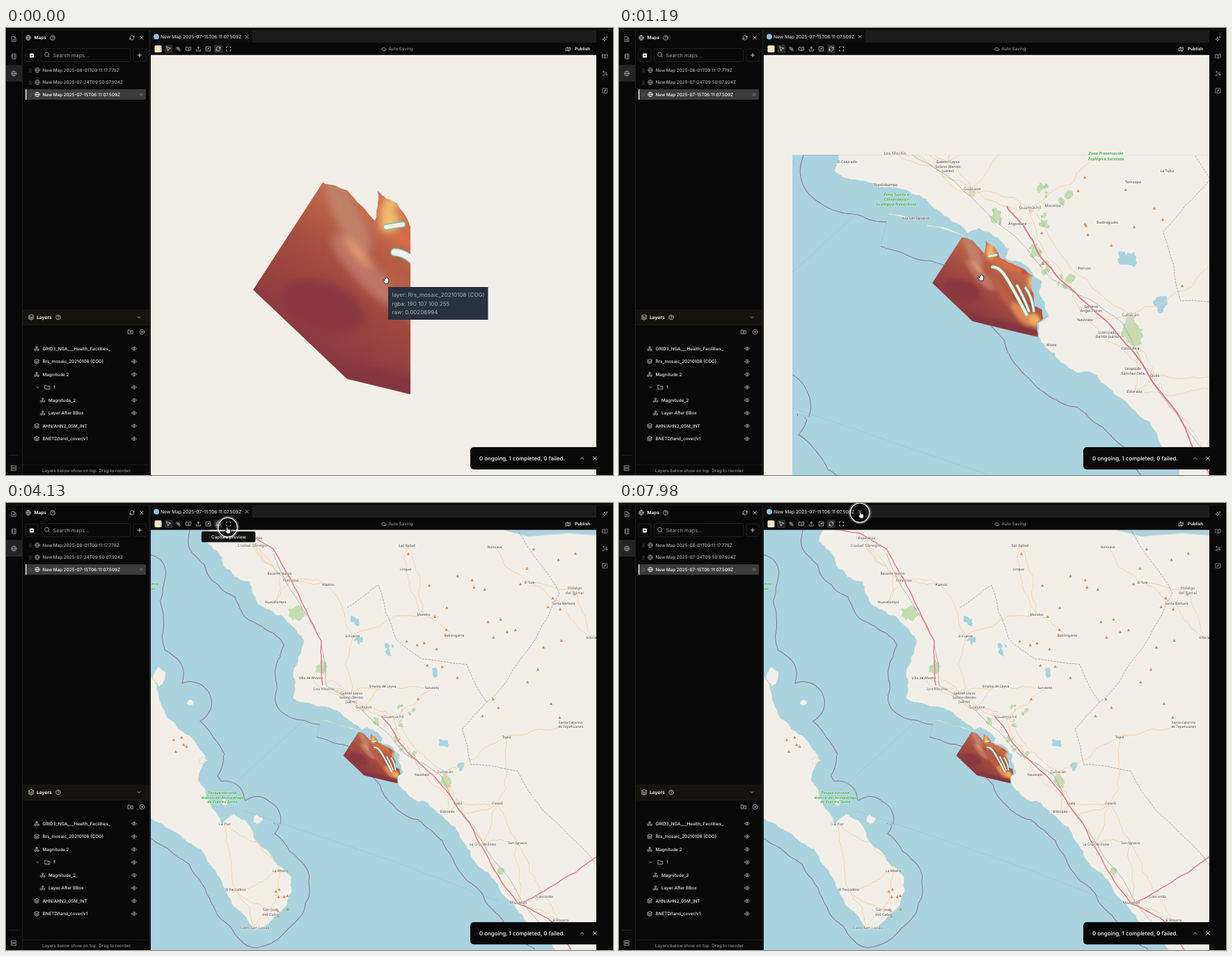
These frames come from a looping animation (872x642 px, 8 s). An HTML page:

```html
<!DOCTYPE html>
<html lang="en">
<head>
<meta charset="utf-8">
<title>Map workspace</title>
<style>
html, body { margin: 0; width: 100%; height: 100%; overflow: hidden; background: #080808; }
svg { display: block; width: 872px; height: 642px; font-family: Inter, "Liberation Sans", sans-serif; text-rendering: geometricPrecision; }
.map text { font-family: "Noto Sans", "DejaVu Sans", sans-serif; text-anchor: middle; fill: #383838;
  stroke: #fff; stroke-opacity: .75; stroke-width: .9px; paint-order: stroke; stroke-linejoin: round; }
.map text.city { fill: #5c5c5c; }
.map text.park { fill: #38a840; font-weight: 600; font-style: italic; }
.line { fill: none; vector-effect: non-scaling-stroke; stroke-linejoin: round; }
.icon { fill: none; stroke-width: 2; stroke-linecap: round; stroke-linejoin: round; }
</style>
</head>
<body>
<svg id="stage" viewBox="0 0 872 642" xmlns="http://www.w3.org/2000/svg"></svg>
<script>
// ---------- geometry helpers ----------
const PIVOT = [521, 359], FAR = 0.2202, MID = 0.431;
const SCALE = { far: 1, mid: MID / FAR, near: 1 / FAR };   // world units are far-view pixels
const SEA = "#aad3df", LAND = "#f2efe9";

let seed = 7;
const random = () => {
  seed = (seed + 0x6D2B79F5) | 0;
  let r = Math.imul(seed ^ (seed >>> 15), 1 | seed);
  r = (r + Math.imul(r ^ (r >>> 7), 61 | r)) ^ r;
  return ((r ^ (r >>> 14)) >>> 0) / 4294967296;
};
const jitter = size => (random() - 0.5) * 2 * size;
const points = str => str.split(" ").map(p => p.split(",").map(Number));
const rescale = (p, s) => p.map((v, i) => PIVOT[i] + (v - PIVOT[i]) * s);
const closeUp = str => points(str).map(p => rescale(p, FAR));
const pathOf = pts => "M" + pts.map(p => p.map(v => v.toFixed(2)).join(" ")).join("L");

// Midpoint displacement turns a few key points into a natural line
const rough = (pts, amount, depth = 4) => depth === 0 ? pts :
  rough(pts.flatMap((b, i) => {
    if (i === 0) return [b];
    const a = pts[i - 1], d = jitter(amount);
    return [[(a[0] + b[0]) / 2 - (b[1] - a[1]) * d, (a[1] + b[1]) / 2 + (b[0] - a[0]) * d], b];
  }), amount, depth - 1);
const patch = (x, y, r) => {
  const ring = Array.from({ length: 7 }, (_, i) => {
    const a = i / 7 * 2 * Math.PI, d = r * (0.5 + random() * 0.7);
    return [x + d * Math.cos(a) * 0.8, y + d * Math.sin(a)];
  });
  return pathOf(rough([...ring, ring[0]], 0.25, 3));
};
const patches = (centres, count, spread, r) => centres.map(([x, y]) =>
  Array.from({ length: count }, () => patch(x + jitter(spread), y + jitter(spread), r * (0.5 + random()))).join("")).join("");
const fill = (color, d, more = "") => `<path fill="${color}" d="${d}" ${more}/>`;
const line = (color, width, d, more = "") => `<path class="line" stroke="${color}" stroke-width="${width}" d="${d}" ${more}/>`;

// ---------- land and water ----------
const mainland = [
  ...points("300,-60 287,55 312,90 350,113 362,146 398,163 427,196 412,244 412,280 446,292"),
  ...closeUp("208,54 285,76 335,95 372,130 440,178 474,208 512,192 576,224 612,262 600,290 650,305 690,340 722,370 713,410 738,470 745,490 712,510 712,557 735,590 785,642"),
  ...points("606,431 645,465 693,531 728,572 774,617 830,690 1200,690 1200,-60 300,-60")];
const peninsula = points("140,90 204,100 204,240 222,286 248,325 287,366 276,398 310,462 327,446 343,455 379,503 410,538 404,577 358,613 333,584 307,538 280,497 226,462 140,410 140,90");
const sandbars = [closeUp("210,142 252,148 336,186 252,154 210,146"), closeUp("336,182 390,188 472,222 390,194 340,186"),
  closeUp("556,318 630,430 690,500")];
const islands = [[222, 250, 13], [362, 455, 8], [314, 430, 6], [283, 370, 9], [264, 286, 6]];
const land = pathOf(rough(mainland, 0.13)) + pathOf(rough(peninsula, 0.1)) +
  sandbars.map(s => pathOf(rough(s, 0.05, 2))).join("") + islands.map(i => patch(...i)).join("");

const woods = closeUp("568,150 725,70 800,90 735,165 705,270 735,325 800,370");
const parks = points("418,160 456,236 712,526 632,396");
const lakes = points("502,170 505,198 628,342 656,374 552,210 612,244");
const towns = points("514,296 557,309 631,388");

// ---------- places; marks: * city, + park, n/m/f view, e fades in, l fades out ----------
const parse = (list, s) => list.trim().split("\n").map(row => {
  const [, x, y, marks, name] = row.match(/^([\d.]+),([\d.]+) (\S+) (.*)$/);
  return { at: rescale([+x, +y], s), marks, name };
});
const region = parse(`
514,293 *nmf Guasave
556.7,307 *nmf Guamúchil
547.3,319 nml Angostura
573.6,305.5 nm Mocorito
472,315 nm Isla San Ignacio
572.5,408.6 nm Altata
631,386 *mf Culiacán
597.5,390 mf Navolato
602,380 ml General|Ángel Flores
597,352 ml Pericos
614,318 ml Badiraguato
614,399 ml Licenciado|Benito Juárez
631,411 ml Costa Rica
633,426 m Leopoldo|Sánchez Celis
649,431 mf Quilá
634,443 mf Eldorado
457,266.5 *mf Los Mochis
496,273 mf Gabriel Leyva|Solano (Benito|Juárez)
450,290 ml Topolobampo
633,288 m Tameapa
658,280 m La Tuna
421.5,273 m El Colorado
458,297 +nm Zona Sujeta a|Conservación|Ecológica Navachiste
613,267 +m Zona Preservación|Ecológica Surutato`, 1);
const distant = parse(`
356,50 e Esperanza
355,61 *e Ciudad Obregón
393,101 e Bacame Nuevo
409,111 *e Navojoa
463,117 f Álamos
387,142 f Huatabampo
498,191 f El Fuerte
600,160 f Morelos
644,190 f Baborigame
574,95 e Urique
576,61 e San Rafael
702,63 e Nonoava
752,114 e El Tule
817,122 *e Hidalgo|del Parral
801,144 e Santa Bárbara
842,193 f Villa las
663,142 l Guachochi
677,225 l Guadalupe|y Calvo
521,249 l Genaro Estrada
438,251 f Villa de Ahome
541,263 f Sinaloa de Leyva
612,265 f Surutato
706,431 f Cosalá
685,490 f La Cruz de Elota
735,488 f San Ignacio
736,574 *f Mazatlán
774,565 f Concordia
797,599 f El Rosario
719,336 e Topia
811,315 e Santa Catarina|de Tepehuanes
314,461 *f La Paz
381,518 l Los Barriles
394,528 f La Ribera
323,545 l Todos Santos
330,555 f El Pescadero
380,584 *e San José|del Cabo
357,610 *e Cabo San Lucas
311,416 +f Parque nacional|marino del Archipiélago|de Espíritu Santo
212,116 +f umca|as`, 1);
const villages = parse(`
482,50 n Los Ángeles
517,84 n El Burrión
495,136 *n Tamazula
444,125 n Buenavista
434,142 n El Crucero
399,160 n El Tortugo
502,172 n El Amole
512,182 n La Brecha
473,224 n Playa Boca
560,226 n Playa Colorada
600,235 n Batury
599,116 n Las Brisas
640,110 n Villa Benito|Juárez
623,132 n Gabriel Leyva|Velázquez|(La Escalera)
673,238 n Campo Plata
676,250 n Agustina|Ramírez
793,132 n Tecomate
800,184 n Rosa Morada
639,304 n Doce de Octubre
713,313 n Leopoldo|Sánchez Celis
763,343 *n Colonia Independencia|(Chinitos)
757,321 n MEX 15D
690,338 n La Reforma
808,408 *n Juan Aldama|(El Tigre)
735,540 n Dautillos
808,544 n Licenciado Alfredo|Valdez Montoya`, FAR);
const places = [...region, ...distant, ...villages];

const label = ({ at, marks, name }, scale, size) => {
  const [x, y] = rescale(at, scale), has = m => marks.includes(m);
  const fs = size * (has("*") ? 1.16 : has("+") ? 1.08 : 1);
  const cls = [has("*") && "city", has("+") && "park", scale === 1 && has("e") && "enter", scale === 1 && has("l") && "leave"];
  return name.split("|").map((part, i) => `<text class="${cls.filter(Boolean).join(" ")}" x="${x.toFixed(1)}"
    y="${(y + fs * (0.36 + i * 1.25)).toFixed(1)}" font-size="${fs}">${part}</text>`).join("");
};
const peaks = (count, x, y, w, h) => Array.from({ length: count }, () =>
  fill("#d08f55", `M${x + random() * w} ${y + random() * h}l2.2 4h-4.4z`)).join("");
const view = (name, marks, size, hills) => `<g id="${name}">${hills}` +
  places.filter(p => [...marks].some(m => p.marks.includes(m))).map(p => label(p, SCALE[name], size)).join("") + "</g>";

// Country roads join each town to its nearest earlier neighbours
const hubs = [...region, ...distant].filter(p => /[fe]/.test(p.marks) && !p.marks.includes("+")).map(p => p.at);
const roads = hubs.flatMap((a, i) => hubs.slice(0, i)
  .map(b => [Math.hypot(a[0] - b[0], a[1] - b[1]), b]).sort((p, q) => p[0] - q[0]).slice(0, 2)
  .filter(([d]) => d < 110).map(([, b]) => pathOf(rough([a, b], 0.12)))).join("");
const road = (str, amount = 0.04) => pathOf(rough(points(str), amount, 3));
const highways = road("306,38 345,43 384,66 408,108 453,198 455,262") +
  road("539.5,306 552,320 565,344 594,374 632,412 692,508 736,576 785,550 848,508") + road("736,576 790,605 812,642");
const border = road("490,150 535,118 560,195 598,224 662,232 690,286 655,325 668,376 735,385 770,440 848,520") +
  road("735,38 795,130 720,255 690,286");

const world = `<g id="world" clip-path="url(#tiles)">
  ${fill(SEA, "M-900-900h2600v2600h-2600z")}
  <g fill="none" stroke-linejoin="round"><path id="limit" stroke="#93708c" d="${land}"/>
  <path stroke="${SEA}" stroke-width="50" d="${land}"/></g>` +
  line("#86b5c6", 0.5, "M312 418L430 310M342 442L560 516 708 572", 'stroke-dasharray="3 1"') +
  fill(LAND, land) + line("#b4d6b0", 0.5, land) +
  `<g clip-path="url(#shore)">` +
  fill("#c3dcb0", patches(woods, 4, 4, 3) + patches(parks, 2, 5, 9)) + fill("#add19e", patches(woods, 3, 5, 1.3)) +
  fill(SEA, patches(lakes, 3, 5, 5)) + fill("#dbd4c9", patches(towns, 1, 0, 4)) +
  line("#f7cfa0", 0.9, roads) + "</g>" +
  line("#9b8fa0", 0.8, border, 'stroke-dasharray="3 1.5"') +
  line("#8f8f8f", 0.6, road("384,72 452,196 460,262 514,300 573,360 625,392 692,500 740,570 790,625")) +
  `<path id="highway" class="line" stroke="#dc7b8e" d="${highways}"/></g>`;

// ---------- coloured swath, drawn in close-up pixels ----------
const shoreEdge = pathOf(rough(points("455,222 490,233 530,277 534,234 562,252 582,290 650,322 692,350 688,395 700,455 724,466 728,496 706,510 710,557"), 0.08, 3));
const glow = (x, y, rx, ry, angle, color) =>
  `<ellipse rx="${rx}" ry="${ry}" fill="${color}" transform="translate(${x} ${y})rotate(${angle})"/>`;
const bank = (d, width) => `<g fill="none" stroke-linecap="round"><path stroke="#7cc0a2" stroke-width="${width + 3}" d="${d}"/>
  <path stroke="${LAND}" stroke-width="${width}" d="${d}"/></g>`;
const raster = `<g clip-path="url(#swath)">${fill("url(#ocean)", "M350 215h390v350H350z")}<g filter="url(#soft)">` +
  glow(455, 400, 62, 34, 20, "#893841") + glow(600, 520, 130, 16, 13, "#83353f") +
  glow(492, 272, 18, 60, -28, "#c0806a") + glow(515, 348, 18, 70, -42, "#bd7566") +
  glow(505, 322, 4, 30, -40, "#f0a878") + glow(595, 410, 18, 80, -36, "#b75f46") +
  glow(655, 480, 20, 50, -40, "#dc8852") + glow(700, 500, 18, 26, -30, "#f1b05c") +
  glow(552, 268, 14, 30, 10, "#f4bf72") + glow(562, 262, 6, 5, 0, "#b9382c") +
  glow(610, 318, 74, 10, 20, "#d86d48") + glow(665, 338, 9, 7, 0, "#a8322d") + glow(690, 375, 14, 24, 0, "#f1bb6c") +
  "</g></g>" + bank("M558 322Q582 322 606 362T672 482", 9) + bank("M668 392Q690 420 696 470M640 385Q660 420 680 470", 7) +
  bank("M546 286l24-4", 6);

// ---------- interface ----------
const RING = "M22 12a10 10 0 11-20 0a10 10 0 0120 0";
const ICONS = {
  file: "M4 2h10l6 6v14H4zM14 2v6h6M8 13h8M8 17h8",
  notebook: "M6 2h14v20H6zM3 7h4M3 12h4M3 17h4M16 2v20",
  globe: RING + "M2 12h20M12 2a15 15 0 010 20a15 15 0 010-20",
  help: RING + "M9 9a3 3 0 116 1c0 2-3 2-3 4M12 17.5h.01",
  close: "M18 6L6 18M6 6l12 12",
  refresh: "M3 11a9 9 0 0116-5l2 3M21 3v6h-6M21 13a9 9 0 01-16 5l-2-3M3 21v-6h6",
  search: "M19 11a8 8 0 11-16 0a8 8 0 0116 0M21 21l-4-4",
  plus: "M5 12h14M12 5v14",
  addCircle: RING + "M8 12h8M12 8v8",
  eye: "M2 12s4-7 10-7 10 7 10 7-4 7-10 7S2 12 2 12M15 12a3 3 0 11-6 0a3 3 0 016 0",
  layers: "M12 2L2 7l10 5 10-5zM2 12l10 5 10-5M2 17l10 5 10-5",
  shapes: "M15.5 6a3.5 3.5 0 11-7 0a3.5 3.5 0 017 0M10 17a4 4 0 11-8 0a4 4 0 018 0M22 17a4 4 0 11-8 0a4 4 0 018 0M12 10v3",
  down: "M6 9l6 6 6-6",
  up: "M18 15l-6-6-6 6",
  folder: "M2 4h7l2 3h11v13H2z",
  addFolder: "M2 4h7l2 3h11v13H2zM9 13h6M12 10v6",
  server: "M3 3h18v7H3zM3 14h18v7H3zM7 6.5h.01M7 17.5h.01",
  sparkle: "M10 4l2 6 6 2-6 2-2 6-2-6-6-2 6-2zM19 2v5M17 4h5",
  book: "M12 7v13M2 4h7l3 3 3-3h7v14h-7l-3 2-3-2H2z",
  wand: "M3 19L17 5l3 3L6 22zM6 3v5M4 5h5M19 14v5M17 16h5",
  formula: "M3 3h18v18H3zM9 17c4 0 2-10 6-10M9 11h6",
  pointer: "M4 3l6 18 3-8 8-3z",
  satellite: "M12 8l4 4-4 4-4-4zM3 7l4-4 4 4-4 4zM13 17l4-4 4 4-4 4zM6 16l3-2M16 6l-2 3",
  upload: "M12 15V3M7 8l5-5 5 5M3 15v6h18v-6",
  frame: "M3 8V3h5M16 3h5v5M21 16v5h-5M8 21H3v-5",
  cloud: "M17 19H8a6 6 0 112-12a7 7 0 018 4a4 4 0 01-1 8",
  map: "M3 8l6-3 6 3 6-3v13l-6 3-6-3-6 3zM9 5v13M15 8v13",
};
const icon = (name, x, y, size = 8, color = "#e4e4e4") =>
  `<path class="icon" stroke="${color}" d="${ICONS[name]}" transform="translate(${x} ${y})scale(${size / 24})translate(-12 -12)"/>`;
const rect = (x, y, w, h, color, more = "") => `<rect x="${x}" y="${y}" width="${w}" height="${h}" fill="${color}" ${more}/>`;
const text = (x, y, str, size = 6.33, color = "#eee", weight = 500) =>
  `<text x="${x}" y="${y + size * 0.36}" font-size="${size}" fill="${color}" font-weight="${weight}">${str}</text>`;
const EDGE = 'stroke="#2b2b2b" stroke-width=".7" rx="2"';

const mapRow = (stamp, i) => {
  const y = 60.5 + 17.5 * i, active = i === 2;
  return (active ? rect(28, y - 7.5, 173, 15, "#3b3b3d", 'rx="2"') + rect(28, y - 7.5, 1.3, 15, "#fff") + icon("eye", 194, y, 6, "#888") : "") +
    `<path d="M34 ${y - 2}v5M36 ${y - 2}v5" stroke="#777" stroke-width=".9" stroke-dasharray="1 1"/>` +
    icon("globe", 45, y, 8, active ? "#fff" : "#aaa") + text(52.5, y, "New Map " + stamp, 6.33, active ? "#fff" : "#b4b4b4");
};
const layerRow = ([kind, name, indent = 0], i) => {
  const y = 460.5 + 18.5 * i;
  return icon(kind, 44 + indent, y) + text(52.5 + indent, y, name) + icon("eye", 184, y);
};
const layerList = [["shapes", "GRID3_NGA___Health_Facilities_"], ["layers", "Rrs_mosaic_20210108 (COG)"], ["shapes", "Magnitude 2"],
  ["folder", "1", 15.5], ["shapes", "Magnitude_2", 8.5], ["shapes", "Layer After BBox", 8.5],
  ["layers", "AHN/AHN2_05M_INT"], ["layers", "BNETD/land_cover/v1"]];
const column = (names, x, y) => names.map((n, i) => icon(n, x, y + 24.7 * i, 8.5, "#aaa")).join("");

const chrome = fill("#080808", "M0 0h872v38.5H0zM0 38h208v604H0zM848 38h24v604h-24z") +
  rect(0, 2.5, 872, 1, "#1d1d1d") + rect(23, 3, 1, 639, "#1e1e1e") + rect(205.5, 3, 2, 639, "#1e1e1e") +
  rect(0, 53, 23, 24, "#242424") + column(["file", "notebook", "globe"], 11.3, 16) +
  rect(4, 613, 15, 0.7, "#333") + icon("server", 11, 632, 9, "#aaa") +
  icon("globe", 32, 14) + text(40.5, 14, "Maps", 6.5, "#fff", 600) + icon("help", 67, 14) +
  icon("refresh", 181, 14) + icon("close", 195, 14, 9) +
  rect(28, 30, 18, 18, "none", EDGE) + rect(34, 36.5, 6, 6, "#fff", 'rx="1"') + rect(35.5, 39, 3, 1, "#111") +
  rect(50.5, 29.5, 128, 19, "none", EDGE) + icon("search", 59, 38.5, 9, "#bbb") + text(67.5, 39.5, "Search maps...", 7.39, "#a2a2a2", 400) +
  rect(183, 30, 18, 18, "none", EDGE) + icon("plus", 192, 39, 9, "#fff") +
  ["2025-08-01T09:11:17.779Z", "2025-07-24T09:50:07.924Z", "2025-07-15T06:11:07.509Z"].map(mapRow).join("") +
  rect(24, 405, 181.5, 21.5, "#15130e", 'stroke="#25221a" stroke-width=".6"') +
  icon("layers", 36, 415.5, 9) + text(44, 415.5, "Layers", 6.75, "#fff", 600) + icon("help", 75, 415.5) + icon("down", 191, 415.5) +
  icon("addFolder", 179, 436.5) + icon("addCircle", 195.5, 436.5) +
  layerList.map(layerRow).join("") + icon("down", 45.5, 516, 7) +
  rect(24, 627, 181.5, 0.7, "#242424") + text(52, 636, "Layers below show on top. Drag to reorder.", 6.3, "#a5a5a5", 400) +
  rect(208, 3.5, 640, 17.5, "#1c1c1c") + rect(208, 3.5, 146, 17.5, "#0d0d0d") +
  `<circle cx="216" cy="12.5" r="4" fill="#8fbfd8"/>` +
  text(222, 12.5, "New Map 2025-07-15T06:11:07.509Z", 6.7, "#f2f2f2", 400) + icon("close", 346, 12.5, 8.5, "#ddd") +
  rect(213.5, 25, 10, 10, "#efe6c6", 'rx="1.5"') + [227.5, 299].map(x => rect(x, 24, 12, 12, "#2a2a2a", 'rx="2"')).join("") +
  ["pointer", "satellite", "book", "upload", "formula", "refresh"].map((n, i) => icon(n, 233.4 + 14.3 * i, 30)).join("") +
  icon("cloud", 543, 30, 8, "#bbb") + text(549.5, 30, "Auto Saving", 6.2, "#aaa", 400) +
  icon("map", 807.5, 30) + text(817, 30, "Publish", 6.2, "#fff", 600) +
  column(["sparkle", "book", "wand", "formula"], 860.5, 16);

const toast = rect(667, 602, 195, 32, "#080808", 'rx="5"') +
  text(680, 618.5, "0 ongoing, 1 completed, 0 failed.", 7.92, "#fff") + icon("up", 827.5, 618, 9) + icon("close", 846, 618, 10);

const stage = document.getElementById("stage");
stage.innerHTML = `<defs>
  <clipPath id="view"><path d="M208 38.5h640V642H208z"/></clipPath>
  <clipPath id="half"><path d="M208 38h373v604H208z"/></clipPath>
  <clipPath id="tiles"><path d="M381 268h900v900h-900z"/></clipPath>
  <clipPath id="shore"><path d="${land}"/></clipPath>
  <clipPath id="swath"><path d="${shoreEdge}L490 504 355 376z"/></clipPath>
  <linearGradient id="ocean" gradientUnits="userSpaceOnUse" x1="600" y1="270" x2="450" y2="500">
    <stop offset="0" stop-color="#cf7a52"/><stop offset=".45" stop-color="#a54d40"/><stop offset="1" stop-color="#83353f"/></linearGradient>
  <filter id="soft" x="-20%" y="-20%" width="140%" height="140%"><feGaussianBlur stdDeviation="6"/></filter></defs>
  <g class="map" clip-path="url(#view)">${rect(208, 38, 640, 604, "#f2efe8")}
    <g id="base">${world}
      ${view("far", "fel", 5, peaks(40, 575, 50, 250, 260) + peaks(9, 385, 550, 20, 45) + peaks(5, 235, 310, 30, 65))}
      ${view("mid", "m", 5.4, peaks(14, 605, 195, 230, 180))}
      ${view("near", "n", 5.3, peaks(14, 685, 80, 155, 220))}</g>
    <g id="crop"><g id="raster">${raster}</g></g></g>
  ${chrome}
  <g id="frame">${icon("frame", 319.5, 30)}</g>
  <path id="spinner" class="icon" stroke="#aaa" d="M21 12a9 9 0 11-6.2-8.56"/>
  ${toast}
  <g id="hint">${rect(281, 41, 77, 15, "#111", EDGE)}${text(295, 48.5, "Capture preview")}</g>
  <g id="probe">${rect(0, 0, 143.5, 47, "#28313e")}${text(5.5, 11.3, "layer: Rrs_mosaic_20210108 (COG)", 8.05, "#a9b1be", 400)}
    <text id="rgba" x="5.5" y="26.5" font-size="8.05" fill="#a9b1be"></text>
    <text id="raw" x="5.5" y="38.9" font-size="8.05" fill="#a9b1be"></text></g>
  <g id="click" fill="none" stroke="#fff"><circle r="13.8" stroke-width="1.3"/><circle r="15.8" stroke-width=".8" opacity=".6"/></g>
  <path id="cursor" fill="#fff" stroke="#111" stroke-width=".9" stroke-linejoin="round"/>`;

// ---------- motion ----------
const part = Object.fromEntries([...stage.querySelectorAll("[id]")].map(e => [e.id, e]));
const entering = stage.querySelectorAll(".enter"), leaving = stage.querySelectorAll(".leave");
const HAND = "M-3 0v-2.5q.8-1 1.4 0v-1.5q.8-1 1.5 0q.8-1 1.5 0v1q.9-.8 1.4 0v3.5l-1 3.5h-4.5l-3-4q0-1 1-1z";
const FINGER = "M-1-4q.8-.8 1.5 0v3q.8-.6 1.4 0q.8-.5 1.3.2q.8-.4 1.2.3v3l-.8 2.5h-4l-2.8-3.5q.3-1 1.4-.3z";

const clamp = v => Math.min(1, Math.max(0, v));
const progress = (t, from, to) => clamp((t - from) / (to - from));
// Each move: start, end, target
const travel = (start, moves, t) => moves.reduce(([x, y], [from, to, tx, ty]) => {
  const f = progress(t, from, to);
  return [x + (tx - x) * f, y + (ty - y) * f];
}, start);
const cursorMoves = [[350, 560, 521, 359], [1820, 1890, 513, 374], [1890, 2030, 219, 461], [2100, 2310, 271, 106],
  [2450, 2660, 289, 82], [2660, 3290, 318, 39], [6650, 7420, 347, 17]];
const probeMoves = [[350, 560, 521, 359], [1820, 1890, 515, 380]];

const show = (el, on) => { el.style.display = on ? "" : "none"; };
const place = (el, [x, y], more = "") => el.setAttribute("transform", `translate(${x} ${y})${more}`);
const zoom = (el, s) => place(el, PIVOT, `scale(${s})translate(${-PIVOT[0]} ${-PIVOT[1]})`);

function draw(t) {
  const k = FAR ** progress(t, 755, 1530), s = k / FAR;
  const level = k > 0.62 ? "near" : k > 0.29 ? "mid" : "far";
  zoom(part.world, s);
  zoom(part.raster, k);
  for (const name in SCALE) {
    show(part[name], name === level);
    zoom(part[name], s / SCALE[name]);
  }
  show(part.base, t >= 70);
  part.base.style.opacity = t < 140 ? 0.6 : 1;
  part.world.setAttribute("clip-path", level === "mid" ? "url(#tiles)" : "none");
  part.crop.setAttribute("clip-path", t < 70 ? "url(#half)" : "none");
  part.limit.setAttribute("stroke-width", 50 + 2 / s);
  part.highway.setAttribute("stroke-width", 0.9 + 0.55 * s);

  const settle = progress(t, 1330, 1750);
  entering.forEach(e => { e.style.opacity = settle; });
  leaving.forEach(e => { e.style.opacity = 1 - settle; });

  const at = travel([547, 363], cursorMoves, t);
  place(part.cursor, at);
  part.cursor.setAttribute("d", at[1] < 46 ? FINGER : HAND);

  show(part.probe, t < 755 || (t >= 1890 && t < 1960));
  place(part.probe, travel([549, 372], probeMoves, t));
  const early = t < 400;
  part.rgba.textContent = "rgba: " + (early ? "190 107 100 255" : "202 129 108 255");
  part.raw.textContent = "raw: " + (early ? "0.00206994" : "0.00239294");

  part.hint.style.opacity = progress(t, 3500, 3710) * (1 - progress(t, 4130, 4270));
  const busy = t >= 4250 && t < 6650;
  show(part.frame, !busy);
  show(part.spinner, busy);
  place(part.spinner, [319.5, 30], `rotate(${(t - 4250) * 0.36})scale(.36)translate(-12 -12)`);
  show(part.click, (t >= 4130 && t < 4270) || t >= 7980);
  place(part.click, t < 6000 ? [318.5, 35] : [346, 14]);
}

const STEP = 70, LOOP = 8000;
function tick() {
  draw(Math.floor(performance.now() % LOOP / STEP) * STEP);
  requestAnimationFrame(tick);
}
tick();
</script>
</body>
</html>
```
